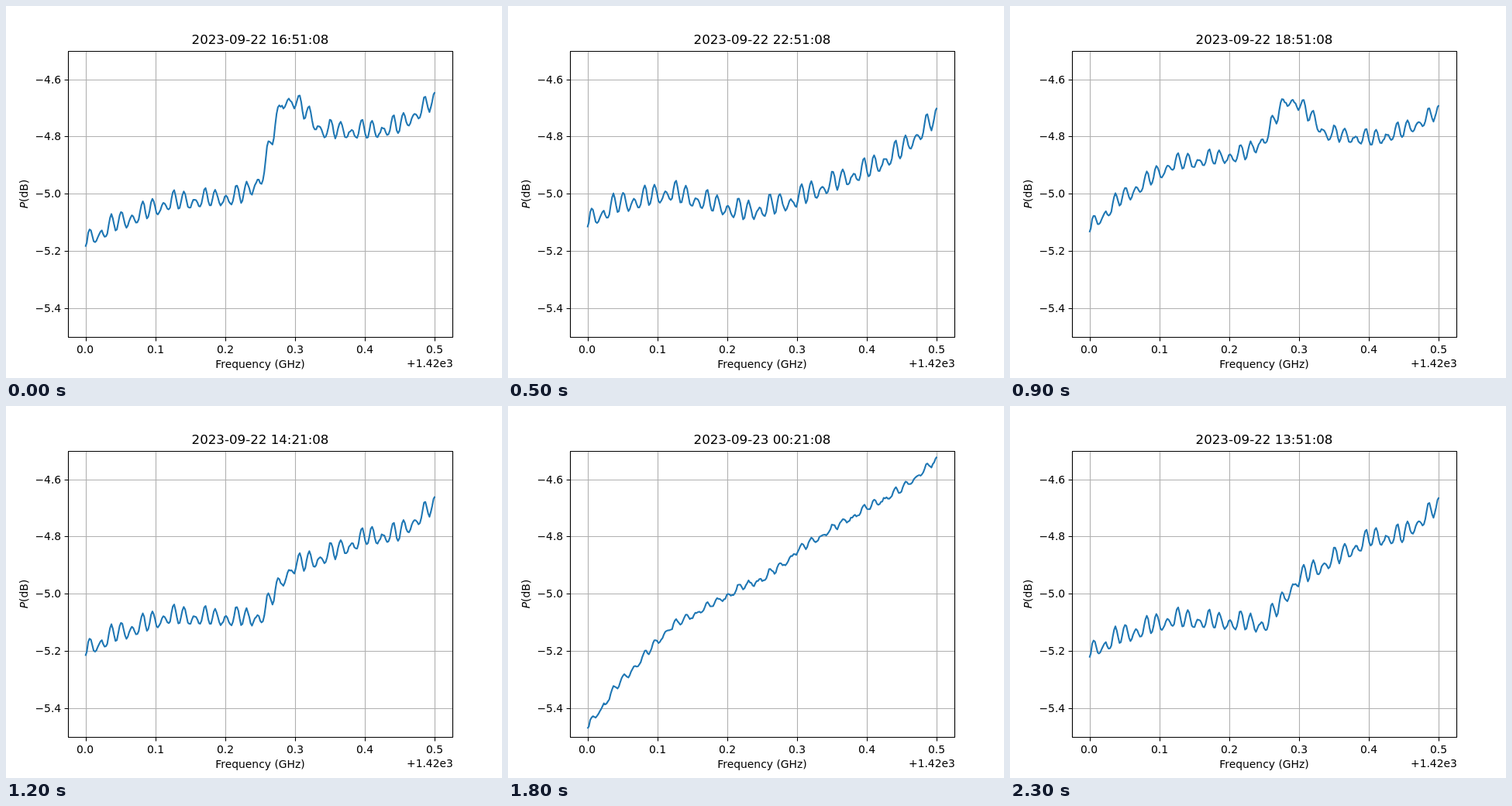
An HTML page that plays this animation: 640x480 px, repeating every 2400 ms.

```html
<!DOCTYPE html>
<html lang="en">
<head>
<meta charset="utf-8">
<title>Spectrum over time</title>
<style>
html, body { margin: 0; width: 100%; height: 100%; overflow: hidden; background: #fff; }
svg { display: block; }
text { font: 13.89px "DejaVu Sans", sans-serif; fill: #000; }
.title { font-size: 16.67px; }
.mid { text-anchor: middle; }
.end { text-anchor: end; }
</style>
</head>
<body>
<svg id="stage" width="640" height="480" viewBox="0 0 640 480"></svg>
<script>
const stage = document.getElementById('stage');

function add(tag, attrs, text = '') {
  const el = document.createElementNS('http://www.w3.org/2000/svg', tag);
  for (const key in attrs) el.setAttribute(key, attrs[key]);
  el.textContent = text;
  stage.append(el);
  return el;
}
const stroke = (d, color, width) =>
  add('path', { d, fill: 'none', stroke: color, 'stroke-width': width, 'stroke-linejoin': 'round' });
const mix = (a, b, u) => a + (b - a) * u;

// Lower envelope of the spectrum at a few key points; step counts half hours after 13:21.
const keyX = [102.5, 140, 208, 303, 330, 356, 370, 409, 467, 505, 550];
const envelopes = [
  { step: 1, ripple: 1, y: [327, 307, 285, 289, 291, 254, 234, 211, 180, 177, 141] },
  { step: 7, ripple: 1, y: [313, 291, 264, 255, 231, 132, 130, 170, 171, 165, 134] },
  { step: 11, ripple: 0.85, y: [294, 259, 213, 199, 178, 128, 132, 173, 180, 170, 147] },
  { step: 13, ripple: 1, y: [306, 279, 249, 251, 235, 188, 193, 219, 210, 187, 150] },
  { step: 19, ripple: 1.1, y: [288, 267, 251, 276, 272, 264, 260, 243, 220, 198, 157] },
  { step: 22, ripple: 0.4, y: [418, 366, 291, 237, 226, 207, 193, 168, 133, 113, 76] }
];

// Index of the segment end around a value, so the outer segments also extrapolate.
function segment(values, v) {
  const i = values.findIndex((value, k) => k > 0 && value >= v);
  return i < 0 ? values.length - 1 : i;
}

function envelopeAt(step) {
  const i = segment(envelopes.map(e => e.step), step);
  const a = envelopes[i - 1], b = envelopes[i];
  const u = (step - a.step) / (b.step - a.step);
  return {
    ripple: mix(a.ripple, b.ripple, u),
    y: a.y.map((v, k) => mix(v, b.y[k], u))
  };
}

function baseline(y, x) {
  const i = segment(keyX, x);
  return mix(y[i - 1], y[i], (x - keyX[i - 1]) / (keyX[i] - keyX[i - 1]));
}

// Standing wave whose height swells every third crest.
function wave(x) {
  const crest = (x - 108.5) / 13.48;
  const height = 19 + 8 * Math.cos((crest - 2.4) * 2 * Math.PI / 3);
  return height * (1 + Math.cos(crest * 2 * Math.PI)) / 2;
}

function grain(i) {
  const s = Math.sin(i * 12.9898) * 43758.5453;
  return 2.8 * (s - Math.floor(s)) - 1.4;
}

function curvePath(step) {
  const { y, ripple } = envelopeAt(step), count = 256, points = [];
  for (let i = 0; i <= count; i++) {
    const x = mix(102.55, 553.45, i / count);
    points.push(x.toFixed(2) + ' ' + (baseline(y, x) - ripple * wave(x) + grain(i)).toFixed(2));
  }
  return 'M' + points.join('L');
}

function timestamp(step) {
  const minutes = 13 * 60 + 21 + step * 30;
  const pad = n => String(n).padStart(2, '0');
  return `2023-09-${22 + Math.floor(minutes / 1440)} ` +
    `${pad(Math.floor(minutes / 60) % 24)}:${pad(minutes % 60)}:08`;
}

// Axes
const snap = v => Math.floor(v + 0.5) + 0.5;
const gridX = Array.from({ length: 6 }, (_, i) => snap(102.55 + i * 90.18));
const gridY = Array.from({ length: 5 }, (_, i) => snap(94.56 + i * 73.92));
add('rect', { width: 640, height: 480, fill: '#fff' });
stroke(gridX.map(x => `M${x} 58V427`).join('') + gridY.map(y => `M80 ${y}H576`).join(''), '#b0b0b0', 1.11);
const line = stroke('', '#1f77b4', 2.08);
stroke('M80.5 58.5H576.5V427.5H80.5Z' + gridX.map(x => `M${x} 427.5v4.9`).join('') +
  gridY.map(y => `M80.5 ${y}h-4.9`).join(''), '#000', 1.11);
gridX.forEach((x, i) =>
  add('text', { x: Math.round(102.4 + i * 90.18), y: 448, class: 'mid' }, (i / 10).toFixed(1)));
gridY.forEach((y, i) =>
  add('text', { x: 71.2, y: Math.floor(y) + 5, class: 'end' }, '\u2212' + (4.6 + i / 5).toFixed(1)));
add('text', { x: 328, y: 467, class: 'mid' }, 'Frequency (GHz)');
add('text', { x: 576.9, y: 466, class: 'end' }, '+1.42e3');
const label = add('text', { transform: 'translate(28 242.5) rotate(-90)', class: 'mid' });
label.innerHTML = '<tspan font-style="italic">P</tspan>(dB)';
const title = add('text', { x: 328, y: 49, class: 'mid title' });

// Half-hour steps in playing order; the first one holds twice as long.
const order = [7, 16, 0, 10, 19, 4, 14, 17, 11, 20, 6, 2, 15, 13, 9, 21, 3, 22, 12, 8, 18, 5, 1];
let shown = -1;

function render(time) {
  const slot = Math.max(0, Math.floor(time % 2400 / 100) - 1);
  if (slot === shown) return;
  shown = slot;
  line.setAttribute('d', curvePath(order[slot]));
  title.textContent = timestamp(order[slot]);
}

const start = performance.now();
function tick() {
  render(performance.now() - start);
  requestAnimationFrame(tick);
}
tick();
</script>
</body>
</html>
```
